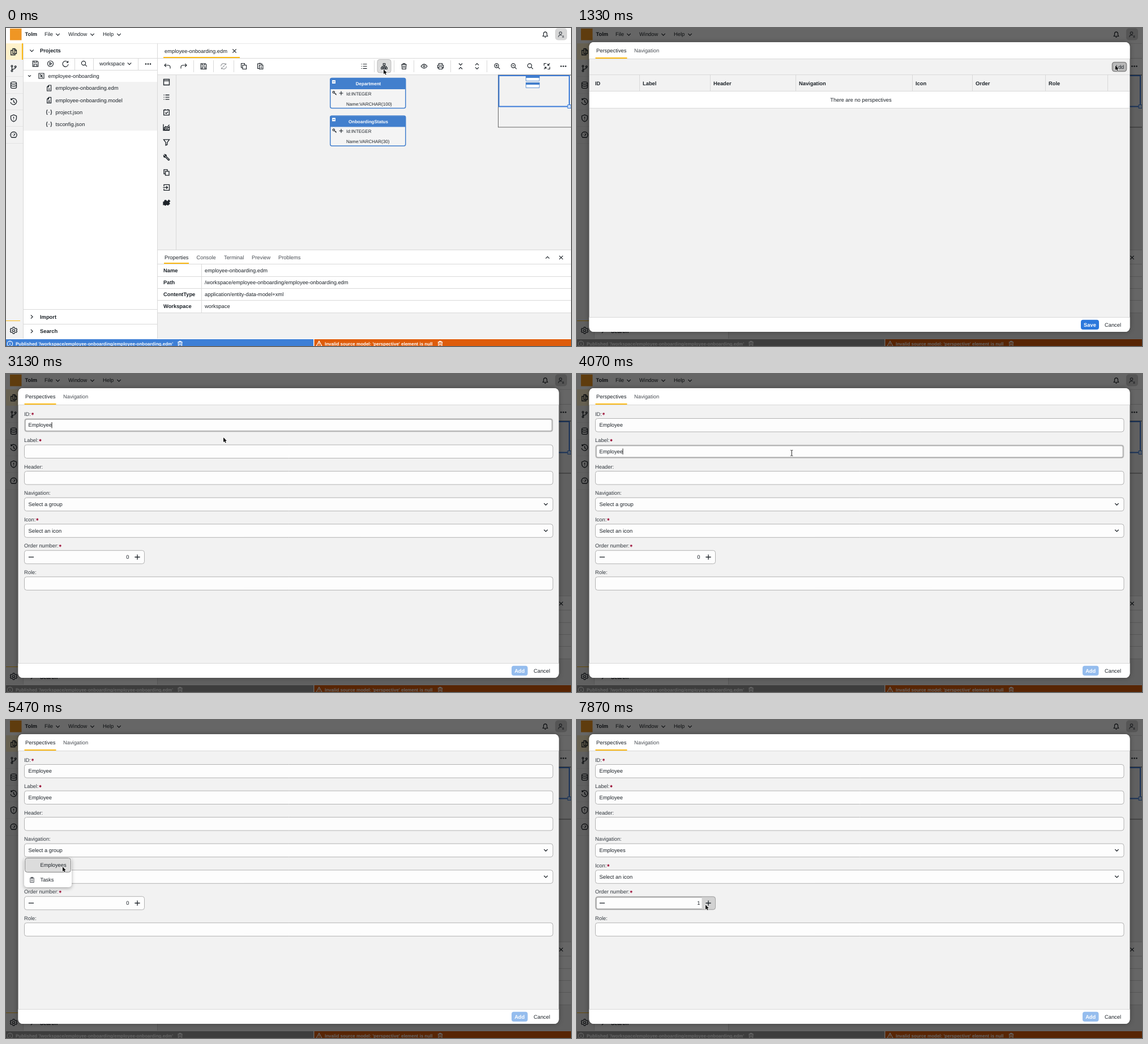
Recreate the animation shown at these times as an HTML page with a canvas. Size 998 px wide and 561 px high, loop 8000 ms.

```html
<!DOCTYPE html>
<html lang="en">
<head>
<meta charset="utf-8">
<title>Perspective editor</title>
<style>
html, body { margin: 0; width: 100%; height: 100%; overflow: hidden; background: #f2f2f2; }
canvas { display: block; width: 998px; height: 561px; }
</style>
</head>
<body>
<canvas id="stage"></canvas>
<script>
const W = 998, H = 561, LOOP = 8000;
const canvas = document.getElementById('stage');
const g = canvas.getContext('2d');
const ratio = window.devicePixelRatio || 1;
canvas.width = W * ratio;
canvas.height = H * ratio;
g.textRendering = 'geometricPrecision';

const FONT = '"Liberation Sans", Arial, sans-serif';
const INK = '#1d2329', LINE = '#d9d9d9', GREY = '#f2f2f2', YELLOW = '#fdb913', BLUE = '#427fcd';

// Times at which the interface changes, in ms
const AT = { dialog: 140, form: 1460, idFocus: 2350, idText: 3000, labelFocus: 3400, labelText: 3600,
  navFocus: 4530, menu: 4730, picked: 5600, step: 7530 };

// Pointer stops: time, x, y
const STOPS = [[0, 667, 73], [270, 667, 73], [1130, 951, 66], [1400, 951, 66], [1930, 433, 72.5],
  [2350, 386, 91], [3000, 386, 91], [3270, 382, 135], [4000, 382, 135], [4530, 325.5, 225],
  [4800, 325.5, 225], [5400, 100, 259], [6000, 100, 259], [6530, 152, 291], [6800, 152, 291],
  [7450, 228, 325], [7700, 228, 325], [7870, 227, 326], [8000, 227, 326]];

const circle = (x, y, r) => `M${x + r} ${y}A${r} ${r} 0 1 1 ${x - r} ${y}A${r} ${r} 0 1 1 ${x + r} ${y}`;
const lens = circle(-1, -1, 3.6) + 'M1.7 1.7L4.8 4.8';
const ICONS = {
  down: 'M-3.2-1.6L0 1.6L3.2-1.6',
  up: 'M-3.2 1.6L0-1.6L3.2 1.6',
  right: 'M-1.6-3.2L1.6 0L-1.6 3.2',
  close: 'M-3.2-3.2L3.2 3.2M3.2-3.2L-3.2 3.2',
  plus: 'M-4.6 0H4.6M0-4.6V4.6',
  minus: 'M-4.6 0H4.6',
  save: 'M-4.8-4.8H3L4.8-3V4.8H-4.8ZM-2.5-4.8V-2H2V-4.8M-2.5 4.8V1H2.5V4.8',
  play: circle(0, 0, 5) + 'M-1.3-2.2L2.2 0L-1.3 2.2Z',
  refresh: 'M4.2-2.5A5 5 0 1 0 5 1M4.6-5V-2.2H1.8',
  search: lens,
  zoomIn: lens + 'M-2.8-1H.8M-1-2.8V.8',
  zoomOut: lens + 'M-2.8-1H.8',
  undo: 'M-2.2-4.6L-5-1.8L-2.2 1M-5-1.8H2A3 3 0 0 1 5 1.2V4',
  redo: 'M2.2-4.6L5-1.8L2.2 1M5-1.8H-2A3 3 0 0 0-5 1.2V4',
  sync: 'M-4.8 0A4.8 4.8 0 0 1 3.8-3M4.8 0A4.8 4.8 0 0 1-3.8 3M4-5.2V-2.8H1.6M-4 5.2V2.8H-1.6M-1.5 1.5L1.5-1.5',
  copy: 'M-2-2H4.5V5H-2ZM-2 2.5H-4.5V-5H1.5V-2',
  paste: 'M-1.5 4H-4.5V-4.5H3V-2.5M-1.5-2H4.8V5H-1.5ZM-2.5-5.2H1M.5 1H3M.5 3H3',
  list: 'M-5-3.8H-3.8M-5 0H-3.8M-5 3.8H-3.8M-2-3.8H5M-2 0H5M-2 3.8H5',
  tree: 'M-1.7-5H1.7V-2H-1.7ZM0-2V2M-3.7 2V0H3.7V2M-5.2 2H-2.2V4.8H-5.2ZM2.2 2H5.2V4.8H2.2ZM-1.4 2H1.4V4.8H-1.4Z',
  trash: 'M-4.6-3.2H4.6M-1.6-3.2V-5H1.6V-3.2M-3.8-3.2L-3.2 5H3.2L3.8-3.2M-1.2-1V3M1.2-1V3',
  eye: 'M-5.4 0Q0-7.2 5.4 0Q0 7.2-5.4 0Z' + circle(0, 0, 1.5),
  print: 'M-3-1.8V-5H3V-1.8M-3 3H-5V-1.8H5V3H3M-3 1H3V5H-3Z',
  collapse: 'M-3-5L0-1.8L3-5M-3 5L0 1.8L3 5',
  expand: 'M-3-1.8L0-5L3-1.8M-3 1.8L0 5L3 1.8',
  fit: 'M5-5L1.5-1.5M1.5-4.5V-1.5H4.5M-5 5L-1.5 1.5M-1.5 4.5V1.5H-4.5M-5-1V-5H-1M5 1V5H1',
  docs: 'M-1.5-5.5H2L5-2.5V3H-1.5ZM-1.5-2.5H-4.8V5.5H2.5V3M1.5-5.5V-2H5M.5 .5H3',
  branch: circle(-3, -4, 1.4) + circle(3.2, -3, 1.4) + circle(-3, 4.3, 1.4) + 'M-3-2.6V2.9M3.2-1.6Q3 1-3 1.8',
  base: 'M-5-3.5A5 2 0 0 1 5-3.5A5 2 0 0 1-5-3.5V3.8A5 2 0 0 0 5 3.8V-3.5M-5 0A5 2 0 0 0 5 0',
  history: 'M-4-4A5.4 5.4 0 1 1-5.4 1M-4.6-5.8V-3.4H-2.2M0-3V.5L2.4 2',
  shield: 'M0-6L5-4V0Q4.5 4.5 0 6Q-4.5 4.5-5 0V-4ZM0-2.6V.8M0 2.2V3.2',
  gauge: 'M-3.6 4.5A5.6 5.6 0 1 1 3.6 4.5ZM0 1.5L2.5-2M-3.5 0H-2.8M0-3.5V-2.8',
  gear: circle(0, 0, 2) + 'M-1.2-5.6H1.2L1.7-4L3.4-3.1L5-3.5L6-1.5L4.7 0L6 1.5L5 3.5L3.4 3.1L1.7 4L1.2 5.6H-1.2L-1.7 4L-3.4 3.1L-5 3.5L-6 1.5L-4.7 0L-6-1.5L-5-3.5L-3.4-3.1L-1.7-4Z',
  frame: 'M-5-5H5V5H-5ZM-5-2.4H5',
  task: 'M-4.8-4H4.8V5H-4.8ZM-2.5-5.6V-3M2.5-5.6V-3M-2.2 .6L-.5 2.4L2.6-1',
  chart: 'M-5.5-5.5V5.5H5.5M-5 2L-1.5-1.5L1 0L5-4.5M-5 4.5L-1.5 1.2L1 2.8L5-1V4.5Z',
  filter: 'M-5-4.8H5L1.3 .2V4L-1.3 5.2V.2Z',
  wrench: 'M4.8 3.2L-.3-1.6Q.6-5-3.2-5L-1.4-3.2L-3.2-1.4L-5-3.2Q-5 .6-1.6-.3L3.2 4.8Q5.6 5.6 4.8 3.2Z',
  leave: 'M-4.5-2.2V-5H5V5H-4.5V2.2M-6 0H2M-.5-2.4L2 0L-.5 2.4',
  puzzle: 'M-5.5-1H-3.5Q-4-4.5-1.5-4Q0-4-.2-2H2L4-4.5L6-2.5L4 0L5.5 2L2.5 4.5L0 3L-2 5L-4 3.5L-5.5 4Z',
  project: 'M-4.5-4.5H4.5V4.5H-4.5ZM-2-2L2 2M2-2L-2 2M-2.4-2.4H-.8M2.4 2.4H.8',
  file: 'M-3.3-2L-.5-5H3.6V5H-3.3ZM-3.3-2H-.5V-5M-1.3 1H1.6M-1.3 3H1.6',
  braces: 'M-2.6-4Q-4-4-4-2.3Q-4 0-5 0Q-4 0-4 2.3Q-4 4-2.6 4M2.6-4Q4-4 4-2.3Q4 0 5 0Q4 0 4 2.3Q4 4 2.6 4M-1.2 0H-.6M.6 0H1.2',
  bell: 'M-4.2 3H4.2L3 1V-1.5Q2.8-4.6 0-4.6Q-2.8-4.6-3-1.5V1ZM-1.2 4.8H1.2',
  user: circle(-1, -2.4, 2.2) + 'M-4.8 4.6Q-4.5 .8-1 .8Q.4 .8 1.2 1.6M2 4.6H5M2.2 2.6H4.8',
  key: circle(-2, -2, 2) + 'M-.5-.5L3.6 3.6M1.8 2L3.2 .8',
  info: circle(0, 0, 4.6) + 'M0-.8V2.6M0-2.8V-2',
  warn: 'M0-4.6L5 4.2H-5ZM0-1.6V1.4M0 2.4V3.2',
  clip: 'M-3.2-3.4H3.2V4.6H-3.2ZM-1.4-4.6H1.4V-2.6H-1.4ZM-1.5 0H1.5M-1.5 2H1.5'
};
for (const name in ICONS) ICONS[name] = new Path2D(ICONS[name]);

function rect(x, y, w, h, color) {
  g.fillStyle = color;
  g.fillRect(x, y, w, h);
}
function box(x, y, w, h, r, fill, stroke, width = 1) {
  g.beginPath();
  g.roundRect(x, y, w, h, r);
  if (fill) { g.fillStyle = fill; g.fill(); }
  if (stroke) { g.strokeStyle = stroke; g.lineWidth = width; g.stroke(); }
}
const hline = (x, y, w, color = LINE) => rect(x, y, w, 1, color);
const vline = (x, y, h, color = LINE) => rect(x, y, 1, h, color);

// y is the middle of the capitals
function text(str, x, y, { bold, color = INK, size = 9.33, align = 'left' } = {}) {
  g.font = `${bold ? 'bold ' : ''}${size}px ${FONT}`;
  g.textAlign = align;
  g.fillStyle = color;
  g.fillText(str, x, y + size * 0.36);
  return g.measureText(str).width;
}
function icon(name, x, y, { color = INK, width = 1.15, scale = 1, fill } = {}) {
  g.save();
  g.translate(x, y);
  g.scale(scale, scale);
  g.lineWidth = width / scale;
  g.strokeStyle = g.fillStyle = color;
  if (fill) g.fill(ICONS[name]);
  g.stroke(ICONS[name]);
  g.restore();
}
function dots(x, y) {
  g.fillStyle = INK;
  for (const d of [-4, 0, 4]) {
    g.beginPath();
    g.arc(x + d, y, 1.3, 0, 7);
    g.fill();
  }
}

function topBar() {
  rect(0, 0, W, 27, '#fff');
  rect(7, 1, 20.5, 20.5, '#ef9624');
  text('Tolm', 33.5, 11, { bold: true });
  [['File', 68, 91.5], ['Window', 110, 152.5], ['Help', 171, 199.5]].forEach(([name, x, arrow]) => {
    text(name, x, 11);
    icon('down', arrow, 11.5);
  });
  icon('bell', 952.5, 11.5);
  box(970, 0.5, 21, 21, 5, '#d6d6d6');
  icon('user', 980.5, 11.5, { color: '#4a4f55' });
}

function sideBar() {
  rect(0, 27, 30, 521, GREY);
  rect(0, 27, 30, 29, '#fff2cb');
  rect(28, 27, 2, 29, YELLOW);
  vline(30, 27, 521);
  ['docs', 'branch', 'base', 'history', 'shield', 'gauge'].forEach((name, i) => {
    icon(name, 13.5, 42 + i * 29.3, { width: 1.3 });
    if (i) hline(0, Math.round(56 + i * 29.3), 30, '#e4e4e4');
  });
  hline(0, 516, 25, YELLOW);
  icon('gear', 13.5, 533.5);
}

function projects() {
  rect(31, 27, 236, 521, '#fff');
  hline(31, 27, 236, '#e8e8e8');
  icon('down', 45.5, 40);
  text('Projects', 60, 40, { bold: true });
  hline(31, 53, 236);
  ['save', 'play', 'refresh', 'search'].forEach((name, i) => icon(name, [52, 78.5, 105, 138][i], 63));
  [121, 154, 233].forEach(x => vline(x, 54, 20));
  text('workspace', 165, 63);
  icon('down', 218, 63);
  dots(251, 63.5);
  hline(31, 74, 236);
  rect(31, 95, 236, 86, GREY);
  icon('down', 41.5, 84.5, { scale: 0.75 });
  icon('project', 62.5, 84.5);
  text('employee-onboarding', 74.5, 84.5);
  ['employee-onboarding.edm', 'employee-onboarding.model', 'project.json', 'tsconfig.json'].forEach((name, i) => {
    const y = 106 + i * 21.3;
    icon(i < 2 ? 'file' : 'braces', 76, y);
    text(name, 87.5, y);
  });
  ['Import', 'Search'].forEach((name, i) => {
    const y = 509.5 + i * 25.5;
    hline(31, Math.floor(y - 13), 236);
    icon('right', 45.5, y);
    text(name, 60, y, { bold: true });
  });
  vline(267, 27, 521);
}

function entity(name, y, type) {
  box(572.75, y + 0.5, 133, 53, 3, '#f4f4f4', BLUE, 1.5);
  rect(572.5, y + 1, 133.5, 19, BLUE);
  box(576, y + 4, 6, 6, 0.5, '#fff');
  rect(577, y + 6.5, 4, 1, BLUE);
  text(name, 640, y + 10.5, { bold: true, color: '#fff', size: 8, align: 'center' });
  icon('key', 580.5, y + 27, { scale: 0.85 });
  icon('plus', 592, y + 27, { scale: 0.75 });
  text('Id:INTEGER', 601, y + 28, { size: 8 });
  text(type, 601, y + 46, { size: 8 });
}

function editor() {
  rect(268, 27, 730, 521, GREY);
  rect(268, 27, 730, 55, '#fff');
  hline(268, 27, 730, '#e8e8e8');
  text('employee-onboarding.edm', 280, 40.5);
  icon('close', 403.5, 40.5);
  hline(268, 53, 730);
  rect(278, 51, 135, 2, YELLOW);
  const tools = { undo: 285, redo: 314, save: 349, sync: 384.5, copy: 420, paste: 449, list: 632.5, tree: 668,
    trash: 703, eye: 738.5, print: 767.5, collapse: 803, expand: 832, zoomIn: 867.5, zoomOut: 897, search: 926, fit: 955.5 };
  box(656, 55.5, 24, 23.5, 4, '#dcdcdc', '#b9b9b9');
  for (const name in tools) icon(name, tools[name], 67.5, { color: name === 'sync' ? '#9a9da0' : INK });
  [331, 366, 402, 650, 685, 720, 785, 849].forEach(x => vline(x, 57, 21));
  dots(984.5, 67.5);
  hline(268, 82, 730);

  vline(300, 83, 308);
  ['frame', 'list', 'task', 'chart', 'filter', 'wrench', 'copy', 'leave', 'puzzle'].forEach((name, i) =>
    icon(name, 283.5, 95.5 + i * 26.55, { width: 1.35, fill: name === 'puzzle' }));

  entity('Department', 88, 'Name:VARCHAR(100)');
  entity('OnboardingStatus', 154.5, 'Name:VARCHAR(30)');

  g.strokeStyle = '#444';
  g.lineWidth = 0.8;
  g.strokeRect(869.5, 83, 135, 92);
  [84, 96].forEach(y => {
    box(918.5, y + 0.5, 23.5, 9, 0, '#fff', BLUE, 0.8);
    rect(918, y, 24.5, 4, BLUE);
  });
  g.strokeStyle = '#3b7bd8';
  g.lineWidth = 2;
  g.strokeRect(870.5, 84, 124.5, 54.5);
  box(992, 135.5, 6, 6, 0, '#cfe0f7', '#3b7bd8');
}

function properties() {
  rect(268, 391, 730, 111, '#fff');
  hline(268, 391, 730);
  ['Properties', 'Console', 'Terminal', 'Preview', 'Problems'].forEach((name, i) =>
    text(name, [280, 336.5, 385, 434, 481][i], 404.5, { color: i ? '#4a4f55' : INK }));
  icon('up', 956.5, 405);
  icon('close', 980.5, 405);
  hline(268, 416, 730);
  rect(279, 414, 44, 2, YELLOW);
  const rows = [['Name', 'employee-onboarding.edm'], ['Path', '/workspace/employee-onboarding/employee-onboarding.edm'],
    ['ContentType', 'application/entity-data-model+xml'], ['Workspace', 'workspace']];
  rows.forEach(([key, value], i) => {
    const y = 427.5 + i * 21.2;
    text(key, 278, y, { bold: true });
    text(value, 351, y);
    hline(268, Math.round(y + 10.5), 730);
  });
  vline(345, 417, 85);
}

function statusBar(dimmed) {
  const white = { bold: true, color: '#fff', size: 8 };
  rect(0, 548, W, 13, '#fff');
  rect(0, 549, 543, 12, dimmed ? '#989898' : '#3d7fd6');
  rect(544.5, 549, 454, 12, '#de5c0b');
  icon('info', 7, 557, { color: '#fff' });
  text("Published '/workspace/employee-onboarding/employee-onboarding.edm'", 17, 557, white);
  icon('trash', 307.5, 557, { color: '#fff', scale: 0.9 });
  icon('warn', 553, 557, { color: '#fff' });
  text("Invalid source model: 'perspective' element is null", 563, 557, white);
  icon('trash', 767, 557, { color: '#fff', scale: 0.9 });
}

function perspectiveTable(p) {
  hline(22, 82, 954);
  hline(22, 111, 954);
  rect(22, 112, 954, 29, '#fff');
  hline(22, 141, 954);
  ['ID', 'Label', 'Header', 'Navigation', 'Icon', 'Order', 'Role'].forEach((name, i) => {
    text(name, [32, 116, 241, 392, 598, 704, 833][i], 97.5, { bold: true });
    vline([110, 235, 386, 592, 698, 827, 937][i], 83, 29);
  });
  text('There are no perspectives', 501.5, 127, { align: 'center' });
  const hover = p.x > 945 && p.x < 971;
  box(945.5, 60.5, 25, 16, 4, hover ? '#b9b9b9' : '#fcfcfc', hover ? '#858585' : '#c4c4c4', hover ? 1.6 : 1);
  text('Add', 958, 68.5, { align: 'center' });
  box(890, 514.7, 32, 17.3, 4, '#2c78dc');
  text('Save', 906, 523.3, { bold: true, color: '#fff', align: 'center' });
}

function label(name, y, required) {
  const w = text(name, 32, y, { color: '#343a40' });
  if (!required) return;
  const x = 35.1 + w;
  g.strokeStyle = '#9c1038';
  g.lineWidth = 1.1;
  g.beginPath();
  for (let i = 0; i < 3; i++) {
    const a = Math.PI / 2 + i * Math.PI / 3, dx = 2.1 * Math.cos(a), dy = 2.1 * Math.sin(a);
    g.moveTo(x - dx, y - dy);
    g.lineTo(x + dx, y + dy);
  }
  g.stroke();
}
const focusRing = (y, width) => box(33.8, y + 1.8, width - 2.6, 20.9, 3, null, '#b0b0b0', 2);

function field(y, { value = '', width = 933.5, focus, caret, bad, select } = {}) {
  const mid = y + 12;
  box(32.5, y + 0.5, width, 23.5, 4, bad ? '#e9dddd' : '#fdfdfd', bad ? '#c4625f' : focus ? '#d6d6d6' : '#b2b2b2');
  if (focus) focusRing(y, width);
  const w = text(value, 39.5, mid);
  if (caret) rect(39.5 + w - 0.5, mid - 5, 1, 10.5, '#222');
  if (select) icon('down', 953.5, mid, { width: 1.3 });
}

function form(t, p) {
  const idFocus = t >= AT.idFocus && t < AT.labelFocus;
  const labelFocus = t >= AT.labelFocus && t < AT.navFocus;
  ['ID:', 'Label:', 'Header:', 'Navigation:', 'Icon:', 'Order number:', 'Role:'].forEach((name, i) =>
    label(name, 70.3 + i * 46.55, [0, 1, 4, 5].includes(i)));
  field(78, { value: t >= AT.idText ? 'Employee' : '', focus: idFocus, caret: idFocus, bad: t < AT.idText });
  field(124.5, { value: t >= AT.labelText ? 'Employee' : '', focus: labelFocus, caret: labelFocus });
  field(171);
  field(217.7, { value: t >= AT.picked ? 'Employees' : 'Select a group', select: true,
    focus: t >= AT.navFocus && t < AT.menu });
  field(264.3, { value: 'Select an icon', select: true });
  stepper(t, p);
  field(357.3);
  if (t >= AT.menu && t < AT.picked) menu(p);
  box(893, 514.7, 28.5, 17.3, 4, '#95bdee');
  text('Add', 907.2, 523.3, { bold: true, color: '#fff', align: 'center' });
}

function stepper(t, p) {
  const hover = p.x > 221 && p.x < 245 && p.y > 311 && p.y < 335;
  const active = t >= AT.step;
  field(310.8, { width: 212, focus: active });
  if (hover) {
    box(220.5, 311.8, 23.5, 22.5, [0, 4, 4, 0], '#d2d2d2');
    if (active) box(33, 311.8, 211.5, 22.5, 4, null, '#a4a4a4');
  }
  icon('minus', 44.5, 323, { width: 1.3 });
  icon('plus', 232, 323, { width: 1.3 });
  text(active ? '1' : '0', 217.5, 323, { align: 'right' });
}

function menu(p) {
  g.save();
  g.shadowColor = 'rgba(0,0,0,.3)';
  g.shadowBlur = 6 * ratio;
  g.shadowOffsetY = 2 * ratio;
  box(32, 242.5, 84, 52.5, 5, '#fff');
  g.restore();
  if (p.x < 115 && p.y > 243) box(33.5, 243.5, 81, 25, 4, '#dcdcdc', '#858585');
  text('Employees', 60.5, 255.3);
  icon('clip', 46, 282, { width: 1, color: '#4a4f55' });
  text('Tasks', 60.5, 282);
}

function dialog(t, p) {
  rect(0, 0, W, H, 'rgba(0,0,0,.6)');
  g.save();
  g.shadowColor = 'rgba(0,0,0,.35)';
  g.shadowBlur = 8 * ratio;
  box(21.5, 25, 955, 511, 8, GREY);
  g.restore();
  g.save();
  g.beginPath();
  g.roundRect(21.5, 25, 955, 511, 8);
  g.clip();
  rect(21, 25, 956, 29, '#fff');
  hline(21, 54, 956);
  rect(21, 511, 956, 25, '#fff');
  hline(21, 510, 956);
  g.restore();
  text('Perspectives', 34, 40);
  text('Navigation', 101, 40, { color: '#4a4f55' });
  rect(32.5, 52, 56, 2, YELLOW);
  if (t < AT.form) perspectiveTable(p); else form(t, p);
  text('Cancel', 946.5, 523.3, { align: 'center' });
}

function pointerAt(t) {
  const i = STOPS.findIndex(s => s[0] > t);
  const [t0, x0, y0] = STOPS[i - 1], [t1, x1, y1] = STOPS[i];
  const u = (t - t0) / (t1 - t0), k = u * u * (3 - 2 * u);
  return { x: x0 + (x1 - x0) * k, y: y0 + (y1 - y0) * k };
}

const ARROW = new Path2D('M0 0V8.2L1.9 6.5L3.3 9.6L4.7 9L3.3 6H5.8Z');
const BEAM = new Path2D('M-2-5Q0-5 0-4Q0-5 2-5M0-4V4M-2 5Q0 5 0 4Q0 5 2 5');
function pointer(t, p) {
  const overText = t >= AT.form && ((p.y > 79 && p.y < 102) || (p.y > 125 && p.y < 149));
  g.save();
  g.translate(p.x, p.y);
  g.lineJoin = 'round';
  g.lineWidth = overText ? 1 : 1.2;
  g.strokeStyle = overText ? '#222' : '#fff';
  g.stroke(overText ? BEAM : ARROW);
  g.fillStyle = '#000';
  if (!overText) g.fill(ARROW);
  g.restore();
}

function draw() {
  const t = performance.now() % LOOP, p = pointerAt(t), open = t >= AT.dialog;
  g.setTransform(ratio, 0, 0, ratio, 0, 0);
  topBar();
  sideBar();
  projects();
  editor();
  properties();
  statusBar(open);
  if (open) dialog(t, p);
  pointer(t, p);
  requestAnimationFrame(draw);
}
draw();
</script>
</body>
</html>
```
